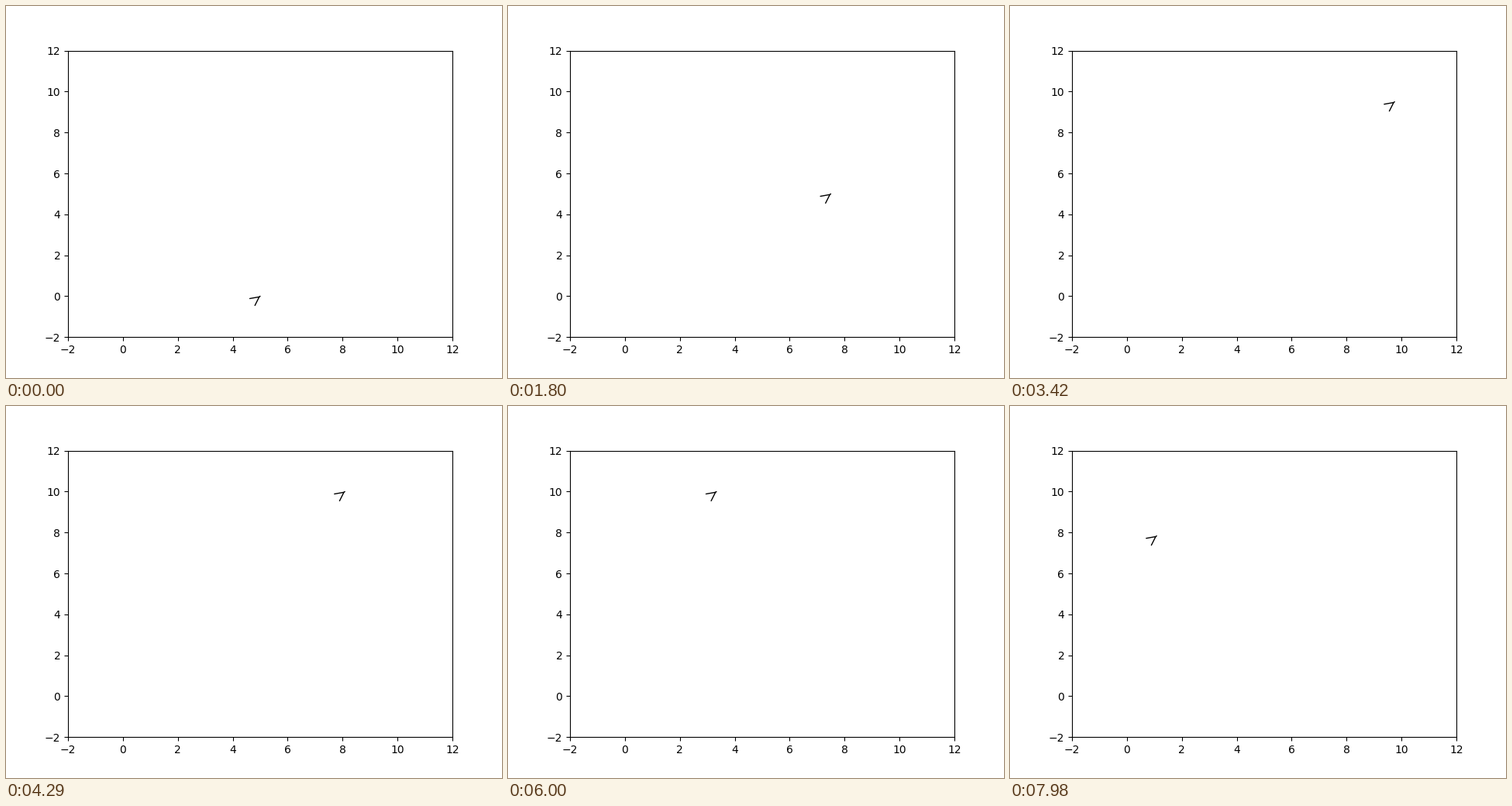
Recreate the animation shown at these times as a matplotlib script. Size 640 px wide and 480 px high, loop 8000 ms.

```python
import matplotlib.pyplot as plt
import numpy as np
from matplotlib.animation import FuncAnimation
from matplotlib.patches import FancyArrowPatch

LOOP_MS = 8000
FRAMES = 267
STEPS = 120       # frames spent on each side of the triangle
TAIL = 1e-3       # tiny shaft, only sets the arrow's direction
CORNERS = np.array([(5, 0), (10, 10), (0, 10)], dtype=float)

fig, ax = plt.subplots(figsize=(6.4, 4.8), dpi=100)
ax.set_xlim(-2, 12)
ax.set_ylim(-2, 12)

arrow = FancyArrowPatch((0, 0), (1, 1), arrowstyle="->", mutation_scale=20,
                        linewidth=1, color="black", shrinkA=0, shrinkB=0)
ax.add_patch(arrow)


def tip(frame):
    side, step = divmod(frame, STEPS)
    start = CORNERS[side % 3]
    end = CORNERS[(side + 1) % 3]
    return start + (end - start) * step / STEPS


def update(frame):
    head = tip(frame)
    arrow.set_positions(head - TAIL, head)
    return (arrow,)


anim = FuncAnimation(fig, update, frames=FRAMES, interval=LOOP_MS / FRAMES,
                     init_func=lambda: update(0), repeat=True, repeat_delay=0)
plt.show()
```
